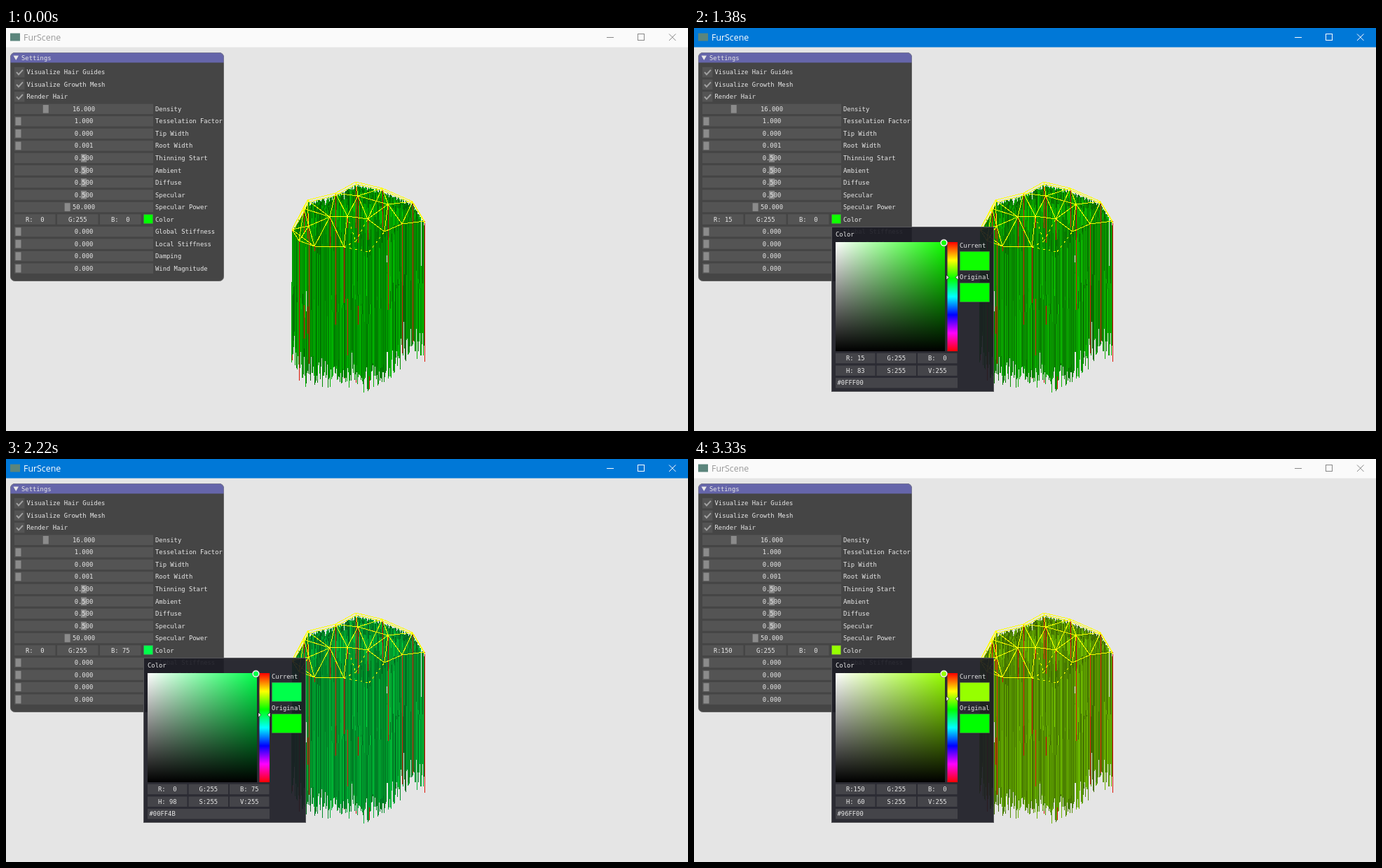
Recreate the animation shown at these times as an HTML page. Size 973 by 576 pixels, loop 3.36 s.

```html
<!DOCTYPE html>
<html lang="en">
<head>
<meta charset="utf-8">
<title>FurScene</title>
<style>
  html, body { margin: 0; width: 100%; height: 100%; overflow: hidden; background: #e5e5e5; }
  svg { display: block; width: 973px; height: 576px; }
  text { font: 8.85px "DejaVu Sans Mono", monospace; fill: #e8e8e8; white-space: pre; }
  .mid { text-anchor: middle; }
  #caption { font: 12.4px "Open Sans", sans-serif; }
  .frame { fill: rgba(110, 110, 110, .39); }
  .grab { fill: rgba(255, 255, 255, .32); }
  .tick { fill: none; stroke: #a0a0a0; stroke-width: 2; }
  .popup { fill: rgba(28, 28, 36, .92); stroke: #56565a; }
  .swatch { stroke: rgba(110, 110, 110, .39); }
  .lines { fill: none; stroke-width: 1; shape-rendering: crispEdges; }
</style>
</head>
<body>
<svg viewBox="0 0 973 576">
  <defs>
    <linearGradient id="tint">
      <stop offset="0" stop-color="#fff"/>
      <stop offset="1" id="tintEnd"/>
    </linearGradient>
    <linearGradient id="shade" x2="0" y2="1">
      <stop offset="0" stop-opacity="0"/>
      <stop offset="1"/>
    </linearGradient>
    <linearGradient id="rainbow" x2="0" y2="1"></linearGradient>
  </defs>

  <rect id="bar" width="973" height="27.5"/>
  <rect x="6" y="7.5" width="14" height="11" fill="#5b857c"/>
  <text id="caption" x="25" y="18">FurScene</text>
  <g id="controls" fill="none">
    <path class="lines" d="M857 13.5h10M901.5 8.5h9v9h-9z"/>
    <path d="M946 8.5l9.5 9.5m0-9.5l-9.5 9.5"/>
  </g>

  <g id="hair" class="lines"></g>
  <g id="mesh" class="lines" stroke="#ff0"></g>

  <g id="panel">
    <rect x="6" y="35" width="305" height="327" rx="7" fill="#454545"/>
    <path d="M6 49.5V42a7 7 0 0 1 7-7H304a7 7 0 0 1 7 7V49.5z" fill="#6565aa"/>
    <rect x="6.5" y="35.5" width="304" height="326" rx="6.5" fill="none" stroke="#808080" stroke-opacity=".5"/>
    <path d="M10.500 39.500h7.500l-3.750 6.500z" fill="#e8e8e8"/>
    <text x="22" y="46">Settings</text>
  </g>

  <g id="tip">
    <rect class="popup" x="225.5" y="274.5" width="162.5" height="45" rx="6.5"/>
    <rect class="swatch" x="231" y="280.5" width="32.5" height="32.5" fill="#0f0"/>
    <text x="270.5" y="290">#00FF00</text>
    <text x="270.5" y="300">R: 0, G: 255, B: 0</text>
    <text x="270.5" y="310.5">(0.000, 1.000, 0.000)</text>
  </g>

  <g id="picker">
    <rect class="popup" x="196.5" y="284.5" width="231" height="235"/>
    <text x="202" y="298">Color</text>
    <rect x="202" y="306" width="156" height="156" fill="url(#tint)"/>
    <rect x="202" y="306" width="156" height="156" fill="url(#shade)"/>
    <rect x="361.5" y="306" width="14.5" height="156" fill="url(#rainbow)"/>
    <g id="arrows" fill="#fff" stroke="#000" stroke-width=".6">
      <path d="M360 -3.5l4 3.5l-4 3.5z"/>
      <path d="M377 -3.5l-4 3.5l4 3.5z"/>
    </g>
    <circle cx="356.5" cy="307" r="5" fill="none" stroke="#808080"/>
    <circle class="live" cx="356.5" cy="307" r="4.2" stroke="#fff" stroke-width="1.3"/>
    <text x="379" y="314">Current</text>
    <rect class="live swatch" x="379.5" y="319.5" width="42" height="27"/>
    <text x="379" y="359">Original</text>
    <rect class="swatch" x="379.5" y="364.5" width="42" height="27" fill="#0f0"/>
  </g>
</svg>
<script>
const $ = id => document.getElementById(id);

function add(parent, tag, attrs, text) {
  const node = document.createElementNS("http://www.w3.org/2000/svg", tag);
  for (const key in attrs) node.setAttribute(key, attrs[key]);
  if (text !== undefined) node.textContent = text;
  parent.appendChild(node);
  return node;
}

const frame = (parent, x, cy, width) =>
  add(parent, "rect", { class: "frame", x, y: cy - 7.25, width, height: 14.5 });
const label = (parent, x, cy, text) => add(parent, "text", { x, y: cy + 3.1 }, text);
const centred = (parent, x, cy, text) =>
  add(parent, "text", { class: "mid", x, y: cy + 3.1 }, text);
const field = (parent, x, cy, width) => {
  frame(parent, x, cy, width);
  return centred(parent, x + width / 2, cy, "");
};

// Piecewise linear value through [x, y] points
function along(points, x) {
  const last = points.length - 1;
  if (x <= points[0][0]) return points[0][1];
  if (x >= points[last][0]) return points[last][1];
  const i = points.findIndex(p => p[0] > x);
  const [x0, y0] = points[i - 1], [x1, y1] = points[i];
  return y0 + (y1 - y0) * (x - x0) / (x1 - x0);
}

// Settings panel
const panel = $("panel");
let rowY = 63.2;
const nextRow = () => { rowY += 17.53; };

for (const name of ["Visualize Hair Guides", "Visualize Growth Mesh", "Render Hair"]) {
  frame(panel, 12, rowY, 14.5);
  add(panel, "path", { class: "tick", d: `M15 ${rowY}l3 3.3l6-6.6` });
  label(panel, 29.5, rowY, name);
  nextRow();
}

function slider(name, value = 0, fraction = 0) {
  frame(panel, 12, rowY, 198);
  add(panel, "rect", { class: "grab", x: 13.5 + 187 * fraction, y: rowY - 5.8, width: 8, height: 11.6 });
  centred(panel, 111, rowY, value.toFixed(3));
  label(panel, 213, rowY, name);
  nextRow();
}

slider("Density", 16, 0.21);
slider("Tesselation Factor", 1);
slider("Tip Width");
slider("Root Width", 0.001);
for (const name of ["Thinning Start", "Ambient", "Diffuse", "Specular"]) slider(name, 0.5, 0.5);
slider("Specular Power", 50, 0.375);

const threeFields = (parent, x, cy, width, pitch) =>
  [0, 1, 2].map(i => field(parent, x + i * pitch, cy, width));
const panelRGB = threeFields(panel, 12, rowY, 58.5, 61);
add(panel, "rect", { class: "live swatch", x: 196.5, y: 266.5, width: 13, height: 13 });
label(panel, 213, rowY, "Color");
nextRow();
for (const name of ["Global Stiffness", "Local Stiffness", "Damping", "Wind Magnitude"]) slider(name);

// Picker
const picker = $("picker");
const pickerRGB = threeFields(picker, 202, 472, 56.5, 58.5);
const pickerHSV = threeFields(picker, 202, 489.7, 56.5, 58.5);
frame(picker, 202, 507.2, 174);
const hex = label(picker, 204.5, 507.2, "");
for (let i = 0; i <= 6; i++)
  add($("rainbow"), "stop", { offset: i / 6, "stop-color": `hsl(${i * 60 % 360} 100% 50%)` });

// Growth mesh: neighbouring vertices are joined
const crown = [[408, 288], [425, 258], [430, 246], [470, 236], [499, 220], [537, 229], [580, 248], [597, 276]];
const inner = [[418, 304], [432, 283], [440, 312], [462, 270], [482, 313], [487, 269],
  [502, 240], [516, 273], [540, 291], [545, 252], [565, 280]];
const front = [[499, 305], [518, 320]];
const vertices = [...crown, ...inner];

function join(from, to, reach) {
  let d = "";
  for (const a of from)
    for (const b of to)
      if (a[0] < b[0] && Math.hypot(a[0] - b[0], a[1] - b[1]) < reach) d += `M${a}L${b}`;
  return d;
}

const mesh = $("mesh");
const rim = "M" + crown.join("L");
add(mesh, "path", { d: join(vertices, vertices, 49) + rim });
add(mesh, "path", { d: rim, transform: "translate(1 3)" });
add(mesh, "path", { d: join(vertices, front, 38) + join(front, vertices, 38), "stroke-dasharray": "3 5" });

// Hair: layers from back to front, each with its own brightness
let seed = 7;
const random = () => (seed = seed * 16807 % 2147483647) / 2147483647;
const fringe = [[408, 276], [430, 319], [482, 311], [518, 323], [597, 265]];
const LAYERS = 30, STRANDS = 42, LENGTH = 203;
const hair = $("hair");

function strands(k) {
  let d = "";
  for (let i = 0; i < STRANDS; i++) {
    const x = 408.5 + Math.floor(random() * 189);
    const depth = (k + random()) / LAYERS;
    const top = along(crown, x), low = along(fringe, x);
    const y0 = top + 3 + random() * 6 + Math.max(0, low - top) * depth ** 4;
    const y1 = low + LENGTH - (1 - depth) * 72 - random() * 30;
    d += `M${x} ${y0.toFixed(1)}L${x + Math.round(random() * 2 - 1)} ${y1.toFixed(1)}`;
  }
  return d;
}

const layers = [];
for (let k = 0; k < LAYERS; k++) {
  if (k === LAYERS - 4) {
    const d = [...vertices, ...front].map(([x, y]) => `M${x + 0.5} ${y}v${LENGTH - random() * 20}`).join("");
    add(hair, "path", { d, stroke: "#e01408" });
  }
  layers.push({ light: 0.4 + 0.34 * random(), path: add(hair, "path", { d: strands(k) }) });
}

// Hue in degrees over time
const hueKeys = [
  [1140, 120], [1260, 102], [1380, 116.5], [1680, 177.1], [1950, 0],
  [2040, 0], [2400, 275.3], [2700, 84.7]
];
const LOOP = 3360, STEP = 30;
const live = document.querySelectorAll(".live");

function hueToRGB(h) {
  return [0, 120, 240].map(peak => {
    const away = Math.abs((h - peak + 540) % 360 - 180);
    return Math.round(255 * Math.min(1, Math.max(0, 2 - away / 60)));
  });
}

const show = (id, on) => { $(id).style.display = on ? "" : "none"; };
const fill = (nodes, names, values) =>
  nodes.forEach((n, i) => { n.textContent = names[i] + ":" + String(values[i]).padStart(3); });

function draw(t) {
  const active = t >= 720 && t < 3330;
  $("bar").setAttribute("fill", active ? "#0078d7" : "#fafafa");
  $("caption").style.fill = active ? "#fff" : "#999";
  $("controls").setAttribute("stroke", active ? "#fff" : "#888");
  show("tip", t >= 690 && t < 720);
  show("picker", t >= 720);

  const hue = along(hueKeys, t);
  const rgb = hueToRGB(hue);
  const color = `rgb(${rgb})`;
  live.forEach(n => n.setAttribute("fill", color));
  $("tintEnd").setAttribute("stop-color", color);
  $("arrows").setAttribute("transform", `translate(0 ${306 + hue / 360 * 156})`);
  fill(panelRGB, "RGB", rgb);
  fill(pickerRGB, "RGB", rgb);
  fill(pickerHSV, "HSV", [Math.round(hue / 360 * 255), 255, 255]);
  hex.textContent = "#" + rgb.map(v => v.toString(16).padStart(2, "0")).join("").toUpperCase();
  layers.forEach(({ light, path }) =>
    path.setAttribute("stroke", `rgb(${rgb.map(v => Math.round(v * light))})`));
}

const start = performance.now();
let shown = -1;
function tick() {
  const t = Math.floor((performance.now() - start) % LOOP / STEP) * STEP;
  if (t !== shown) draw(shown = t);
  requestAnimationFrame(tick);
}
tick();
</script>
</body>
</html>
```
